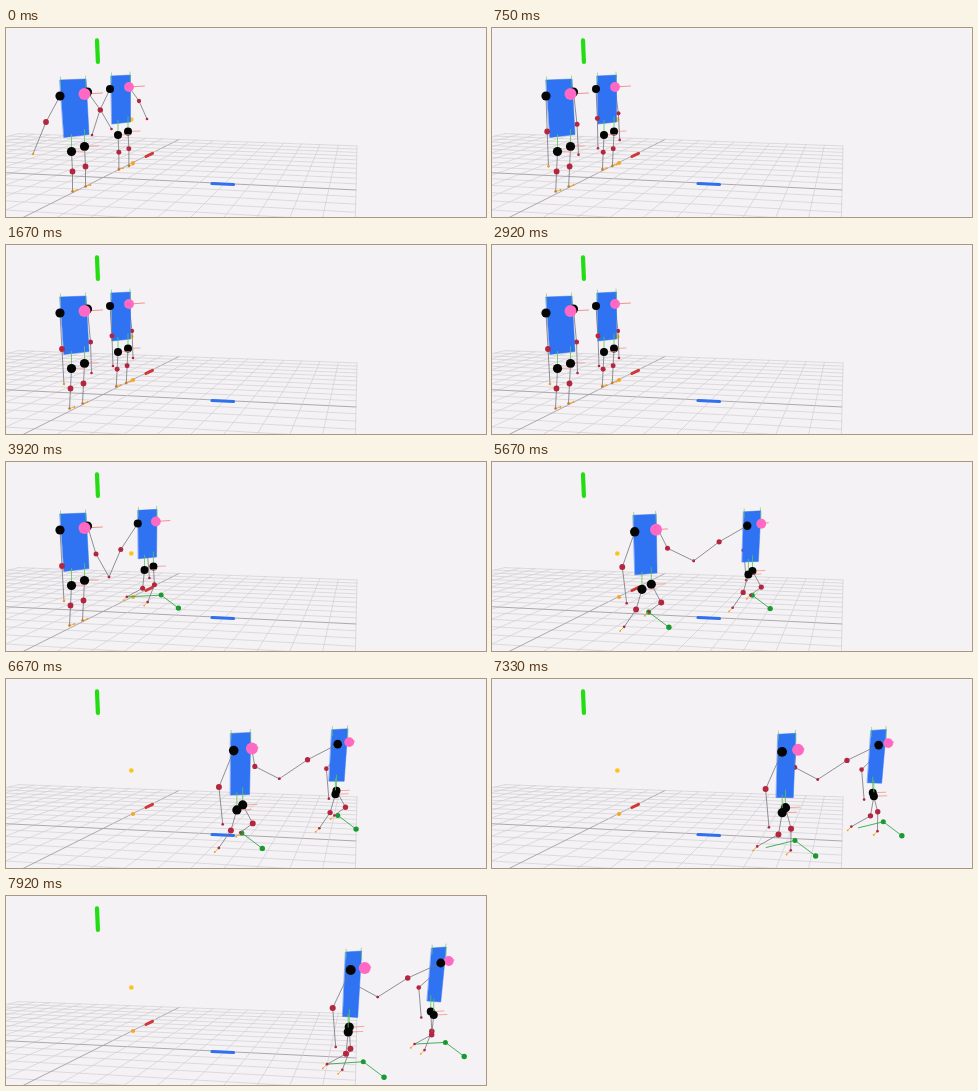
An HTML page that plays this animation: 480 px wide and 189 px high, repeating every 8000 ms.

```html
<!DOCTYPE html>
<html lang="en">
<head>
<meta charset="utf-8">
<title>Two walkers hand in hand</title>
<style>
html, body { margin: 0; width: 100%; height: 100%; overflow: hidden; background: #f4f2f5; }
svg { display: block; width: 100vw; height: 100vh; }
</style>
</head>
<body>
<svg viewBox="0 0 480 189" fill="none" stroke-linecap="round" stroke-linejoin="round">
  <g id="floor"></g>
  <path d="M91 12.300L91.900 34" stroke="#22dd12" stroke-width="4.2"/>
  <path d="M140 128.500L146.500 125.300" stroke="#d03838" stroke-width="3"/>
  <path d="M206 155.500L227.500 156.500" stroke="#2f70ee" stroke-width="3.2"/>
  <circle cx="127" cy="135" r="2.100" fill="#f5a623"/>
  <circle cx="125.300" cy="91.500" r="2.300" fill="#fcc419"/>
  <g id="actors"></g>
</svg>
<script>
const LOOP = 8000, FPS = 12, STEP = 0.5;
const BLACK = '#050505', RED = '#b4263e', PINK = '#ff69c4', BLUE = '#2f72f2',
      ORANGE = '#f0a020', GREEN = '#189a30', BONE = '#77777c';

const mix = (a, b, k) => a + (b - a) * k;
const mixPt = (p, q, k) => p.map((v, i) => mix(v, q[i], k));
const add = (p, x, y) => [p[0] + x, p[1] + y];
const ramp = (t, a, b) => {
  const k = Math.min(1, Math.max(0, (t - a) / (b - a)));
  return k * k * (3 - 2 * k);
};
const num = v => v.toFixed(2);
const pts = list => list.map(p => p.map(num).join()).join(' ');
const line = (list, color = BONE, width = 0.8) =>
  `<polyline points="${pts(list)}" stroke="${color}" stroke-width="${width}"/>`;
const dot = (p, r, color) =>
  `<circle cx="${num(p[0])}" cy="${num(p[1])}" r="${num(r)}" fill="${color}"/>`;
const quad = list => `<polygon points="${pts(list)}" fill="${BLUE}" stroke="${BLUE}" stroke-width="0.5"/>`;

// Linear track through [time, value] keys, held at both ends.
function track(keys, t) {
  if (t <= keys[0][0]) return keys[0][1];
  for (let i = 1; i < keys.length; i++) {
    const [a, p] = keys[i - 1], [b, q] = keys[i];
    if (t <= b) return mix(p, q, (t - a) / (b - a));
  }
  return keys[keys.length - 1][1];
}

// Smooth cyclic curve through four leg poses: knee x, y, foot x, y.
function cycle(poses, phase) {
  const f = phase * poses.length, i = Math.floor(f), k = f - i;
  const at = n => poses[(n + poses.length) % poses.length];
  return at(i).map((b, j) => {
    const a = at(i - 1)[j], c = at(i + 1)[j], d = at(i + 2)[j];
    return b + 0.5 * k * (c - a + k * (2 * a - 5 * b + 4 * c - d + k * (3 * (b - c) + d - a)));
  });
}
const NEAR = [[-6, 20, -18, 37], [-4, 21, -24, 34], [-2, 21, -20, 31], [8, 19, 6, 39]];
const FAR = [[10, 18, -2, 27], [7, 20, 8, 40], [1, 21, -7, 41], [-5, 20, -18, 36]];

// Each measure is [at the left end, change over the whole walk].
const FRONT = {
  xs: [[4.5, 54], [4.92, 82.5], [5.67, 143], [6.67, 228], [7.92, 345]], span: 291, start: 4.42, stride: 4.75,
  y: [68, 6], scale: [1, 0.04], topX: [0, -5], topY: [-16, -2], botX: [4, -12], botY: [41.500, 5],
  width: [26, -10], tilt: [-3, 4], pinkX: [24.5, -10.5], hipX: [11.500, -14], hipY: [55.500, 6.500],
  hipGap: [13, -12], hipRise: -5, joint: 4.6, head: 6
};
const BACK = {
  xs: [[3.5, 104], [3.92, 132], [4.92, 200.5], [5.67, 255.5], [6.67, 332], [7.92, 435]], span: 331, start: 3.42, stride: 3.42,
  y: [61, 6], scale: [0.86, 0.08], topX: [1, -10], topY: [-13, -2], botX: [2, -15.500], botY: [35, 3],
  width: [19.500, -5], tilt: [-2, 3], pinkX: [19, -11], hipX: [8, -15], hipY: [46, 6],
  hipGap: [10, -13], hipRise: -3.500, joint: 4, head: 4.900
};

function body(def, t) {
  const x = track(def.xs, t), u = (x - def.xs[0][1]) / def.span;
  const m = key => def[key][0] + def[key][1] * u;
  const left = [x, m('y')], right = add(left, m('pinkX'), -2), s = m('scale');
  const walk = ramp(t, def.start, def.start + 0.5);
  const stride = ramp(t, def.stride, def.stride + 0.5);
  const top = add(left, m('topX'), m('topY')), bottom = add(left, m('botX'), m('botY'));
  const hip = add(left, m('hipX'), m('hipY')), hip2 = add(hip, m('hipGap'), def.hipRise);
  const phase = (t / STEP + 0.66) % 1, settle = 2 * Math.exp(-4 * t);
  const stand = [settle - 1, 20, settle * 1.5 - 2, 40];
  const leg = (from, poses) => {
    const [kx, ky, fx, fy] = mixPt(stand, cycle(poses, phase), walk).map(v => v * s);
    return { hip: from, knee: add(from, kx, ky), foot: add(from, fx, fy) };
  };
  return {
    def, u, s, walk, stride, left, right, phase,
    torso: [top, add(top, m('width'), -1), add(bottom, m('width') - 1, m('tilt')), bottom],
    legs: [leg(hip2, FAR), leg(hip, NEAR)]
  };
}

const drawArm = (list, r, tip) =>
  line(list) + dot(list[1], r, RED) + dot(list[2], 1.300, tip);

function drawLegs(b) {
  let out = '';
  for (const { hip, knee, foot } of b.legs) {
    const toe = add(foot, mix(5, -4, b.walk) * b.s, mix(-1.500, 4, b.walk) * b.s);
    out += line([add(hip, 0, -17 * b.s), hip], '#58c45c', 0.8)
      + line([hip, add(hip, 14 * b.s, -0.5)], '#f08a80', 0.7)
      + line([hip, knee, foot]) + line([foot, toe], ORANGE, 0.8)
      + dot(toe, 0.9, ORANGE) + dot(foot, 1.300, b.walk < 0.5 ? '#c87a24' : RED)
      + dot(knee, 2.9 * b.s, RED) + dot(hip, b.def.joint, BLACK);
  }
  return out;
}

// Foot path: it grows out of the standing foot, then swings with each step.
function drawSteps(b) {
  if (b.stride < 0.05) return '';
  const [far, near] = b.legs, c = -Math.cos(b.phase * 2 * Math.PI);
  const mid = mixPt(far.hip, near.hip, 0.5);
  const a = mixPt(add(far.foot, 14, -1), add(mid, (8 + 6 * c) * b.s, (28 + 3 * c) * b.s), b.stride);
  const z = add(a, 20 * b.s * b.stride, 15 * b.s * b.stride);
  const from = mixPt(a, mixPt(far.foot, near.foot, (1 + c) / 2), b.stride);
  return line([from, a, z], '#35a849', 0.9) + dot(a, 2.5, GREEN) + dot(z, 2.7, GREEN);
}

function drawBody(b, farArm, nearArm) {
  const [tl, tr] = b.torso, r = b.def.joint;
  const peek = Math.max(0, 3 - 8 * b.u);
  const second = b.def === FRONT ? dot(add(b.right, peek, -peek * 0.67), r, BLACK) : '';
  return drawArm(farArm, 2.5 * b.s, RED) + quad(b.torso)
    + line([add(tl, 0.5, -3), add(tl, 0.5, 6)], '#62c866', 0.6)
    + line([add(tr, -0.5, -3), add(tr, 0, 9)], '#62c866', 0.6)
    + drawSteps(b) + drawLegs(b)
    + line([b.right, add(b.right, Math.max(6, 18 - 22 * b.u) * b.s, -1)], '#f07a78', 0.8)
    + drawArm(nearArm, 2.9 * b.s, b.def === FRONT && b.walk < 0.5 ? ORANGE : RED)
    + second + dot(b.right, b.def.head, PINK) + dot(b.left, r + 0.4 * b.u, BLACK);
}

function scene(t) {
  const a = body(FRONT, t), b = body(BACK, t);
  const drop = Math.exp(-4 * t), meet = ramp(t, 3.350, 3.920), hold = ramp(t, 3.920, 4.920);
  // An arm is [elbow, hand], relative to its shoulder.
  const limb = (from, out, down) => out.map((p, i) => add(from, ...mixPt(down[i], p, drop)));
  const blend = (p, q, k) => p.map((v, i) => mixPt(v, q[i], k));

  const aOut = blend(limb(a.left, [[-14, 26], [-27, 58]], [[2, 36], [4, 71]]),
    [add(a.left, -10 - 8 * a.u, 34 + 4 * a.u), add(a.left, -5 - 10 * a.u, 69 + 8 * a.u)], a.walk);
  const aRoot = add(a.right, 3 - 6 * a.u, -2);
  const reach = blend([[36, 24], [49, 47]], [[45 - 40 * a.u, 17 - 2 * a.u], [73 - 46 * a.u, 30 - 3 * a.u]], hold)
    .map(p => add(a.left, ...p));
  const aIn = blend(limb(aRoot, [[13, 18], [24, 37]], [[3, 33], [4, 64]]), reach, meet);

  const bElbow = add(b.left, ...mixPt([-17, 26], [-24 - 9 * b.u, 17 - 2 * b.u], hold));
  const bIn = blend(limb(b.left, [[-10, 21], [-18, 46]], [[2, 30], [3, 60]]), [bElbow, aIn[1]], meet);
  const bx = -7 - 23 * b.u;
  const bOut = blend(limb(b.right, [[10, 14], [18, 32]], [[3, 27], [4, 54]]),
    [add(b.right, bx, 26.5), add(b.right, bx + 2.5, 56.5)], b.walk);

  return drawBody(b, [b.right, ...bOut], [b.left, ...bIn])
    + drawBody(a, [aRoot, ...aIn], [a.left, ...aOut]);
}

// Perspective floor: s runs to the right, d into the distance.
function floor() {
  const at = (s, d) => {
    const w = 1 - 0.074 * s + 0.4218 * d;
    return [(97 + 227.1 * s + 149 * d) / w, (149.5 + 0.5 * s + 9 * d) / w];
  };
  const cells = 10;
  let out = '';
  const rule = (p, q, axis) => {
    out += line([p, q], axis ? '#a3a1a3' : '#cfcdd0', axis ? 0.9 : 0.65);
  };
  for (let i = -cells; i <= cells; i++) {
    const k = i / cells;
    rule(at(k, -1), at(k, 1), i === 0);
    rule(at(-1, k), at(1, k), i === 0);
  }
  return out;
}

document.getElementById('floor').innerHTML = floor();
const actors = document.getElementById('actors');
const began = performance.now();
let shown = -1;
function tick() {
  const ms = (performance.now() - began) % LOOP;
  const n = Math.floor((ms + 4) * FPS / 1000) % (LOOP * FPS / 1000);
  if (n !== shown) actors.innerHTML = scene((shown = n) / FPS);
  requestAnimationFrame(tick);
}
tick();
</script>
</body>
</html>
```
